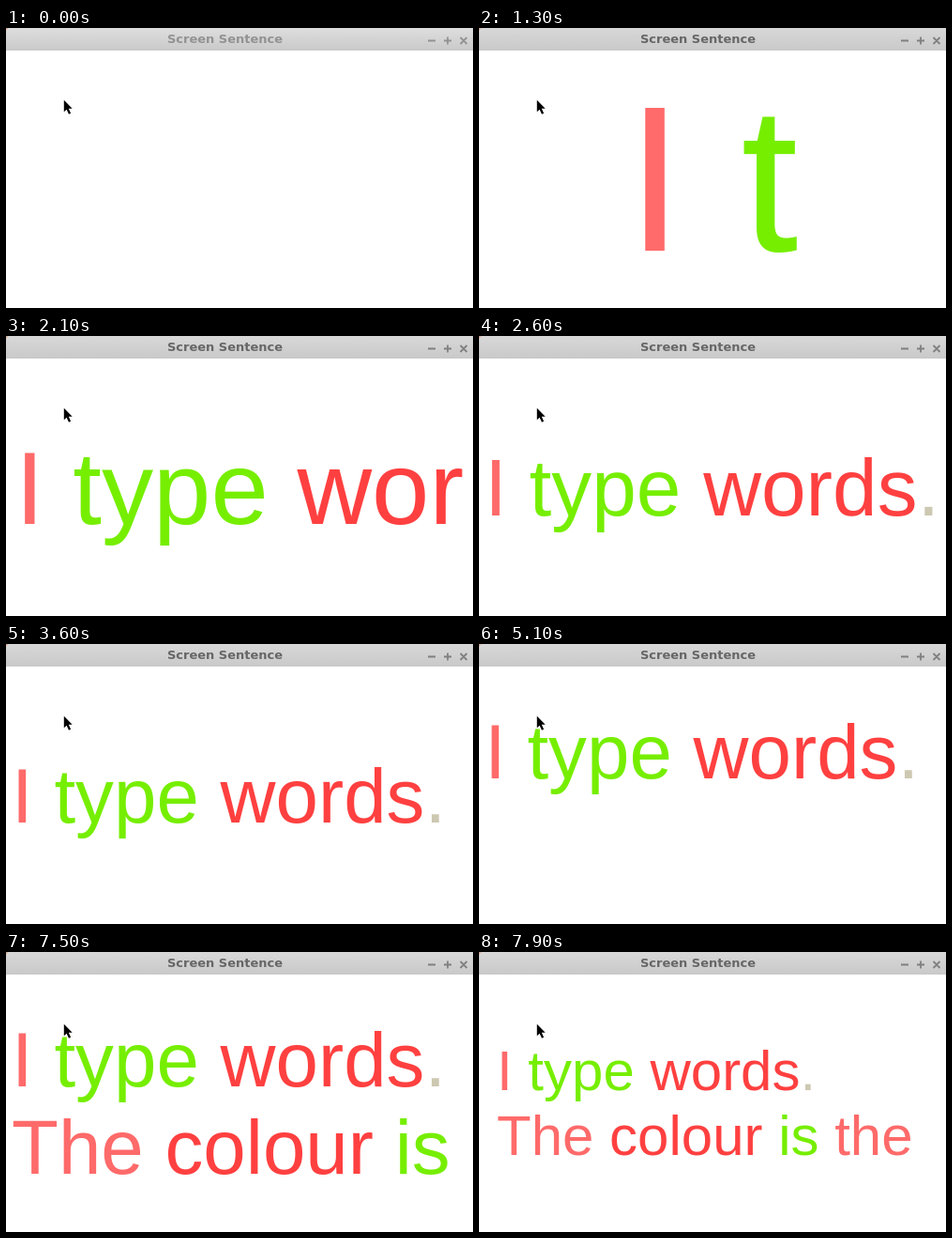
Write an HTML page that moves like this. It is 498x298 px and loops after 8 s.

```html
<!DOCTYPE html>
<html lang="en">
<head>
<meta charset="utf-8">
<title>Screen Sentence</title>
<style>
  html, body { margin: 0; width: 100%; height: 100%; overflow: hidden; background: #fff; }
  svg { display: block; width: 498px; height: 298px; }
  .line { font-family: "Liberation Sans", Arial, sans-serif; font-kerning: none; white-space: pre; }
  .title { font: bold 13px "DejaVu Sans", sans-serif; }
</style>
</head>
<body>
<svg viewBox="0 0 498 298">
  <defs>
    <linearGradient id="bar" x1="0" y1="0" x2="0" y2="1">
      <stop id="barTop" offset="0"/>
      <stop offset="1" stop-color="#c9c9c9"/>
    </linearGradient>
  </defs>
  <rect width="498" height="298" fill="#fff"/>
  <rect width="498" height="24" fill="url(#bar)"/>
  <path d="M0 0H3L1 1L0 3Z" fill="#d9a488"/>
  <text id="title" class="title" x="233.5" y="16" text-anchor="middle">Screen Sentence</text>
  <path id="buttons" fill="none" stroke-width="1.8"
    d="M450 13.5H458M467 13.5H475M471 9.5V17.5M484.5 10L491.5 17M491.5 10L484.5 17"/>
  <g id="sentence">
    <text class="line" xml:space="preserve"></text>
    <text class="line" xml:space="preserve"></text>
  </g>
  <path d="M61.8 76.7V89.2L64.6 86.7L67 91.7L69.1 90.8L66.8 85.8H70.7Z" fill="#000"/>
</svg>
<script>
const LOOP = 8000;
const CENTER = 249;
const LEADING = 1.143;
const first = "I type words. ";

// start time, text, font size
const steps = [
  [0, "", 220],
  [900, "I", 220],
  [1100, "I ", 220],
  [1300, "I t", 220],
  [1400, "I typ", 220],
  [1600, "I type ", 172],
  [1900, "I type w", 137],
  [2000, "I type wo", 119],
  [2100, "I type wor", 110.3],
  [2200, "I type word", 98.7],
  [2300, "I type words", 90.6],
  [2600, "I type words.", 85.6],
  [3600, first, 81.7],
  [5100, first + "\n", 81.7],
  [6000, first + "\nThe", 81.7],
  [6400, first + "\nThe co", 81.7],
  [6600, first + "\nThe col", 81.7],
  [7000, first + "\nThe colour", 81.7],
  [7500, first + "\nThe colour is", 81.7],
  [7700, first + "\nThe colour is t", 73.3],
  [7900, first + "\nThe colour is the ", 60]
];

const $ = id => document.getElementById(id);
const rows = [...$("sentence").children];
let shown = null;

function colorOf(word) {
  if (word === ".") return "#cdc8b1";
  if (/^(I|the)$/i.test(word)) return "#ff6a6a";
  if (/^(t|typ|type|is)$/.test(word)) return "#76ee00";
  return "#ff4040";
}

function fillRow(row, text, size) {
  row.textContent = "";
  row.setAttribute("font-size", size);
  for (const part of text.match(/\w+|\.|\s+/g) || []) {
    const span = document.createElementNS("http://www.w3.org/2000/svg", "tspan");
    span.textContent = part;
    span.setAttribute("fill", colorOf(part));
    row.append(span);
  }
  return text ? row.getComputedTextLength() : 0;
}

// Centre the block of lines; the longest line sets the left edge.
function layout([, text, size]) {
  const lines = text.split("\n");
  const leading = Math.round(size * LEADING);
  const widths = rows.map((row, i) => fillRow(row, lines[i] || "", size));
  const left = Math.round(CENTER - Math.max(...widths) / 2);
  const rise = Math.ceil((lines.length - 1) * leading / 2);
  const base = Math.floor(162.08 + size * 0.3449) - rise;
  rows.forEach((row, i) => {
    row.setAttribute("x", left);
    row.setAttribute("y", base + i * leading);
  });
}

function render(t) {
  const active = t >= 200;
  $("title").setAttribute("fill", active ? "#666" : "#929292");
  $("buttons").setAttribute("stroke", active ? "#808080" : "#929292");
  $("barTop").setAttribute("stop-color", active ? "#d8d8d8" : "#dedede");
  const step = steps.findLast(s => s[0] <= t);
  if (step !== shown) layout(shown = step);
}

const start = performance.now();
function tick() {
  render((performance.now() - start) % LOOP);
  requestAnimationFrame(tick);
}
tick();
</script>
</body>
</html>
```
